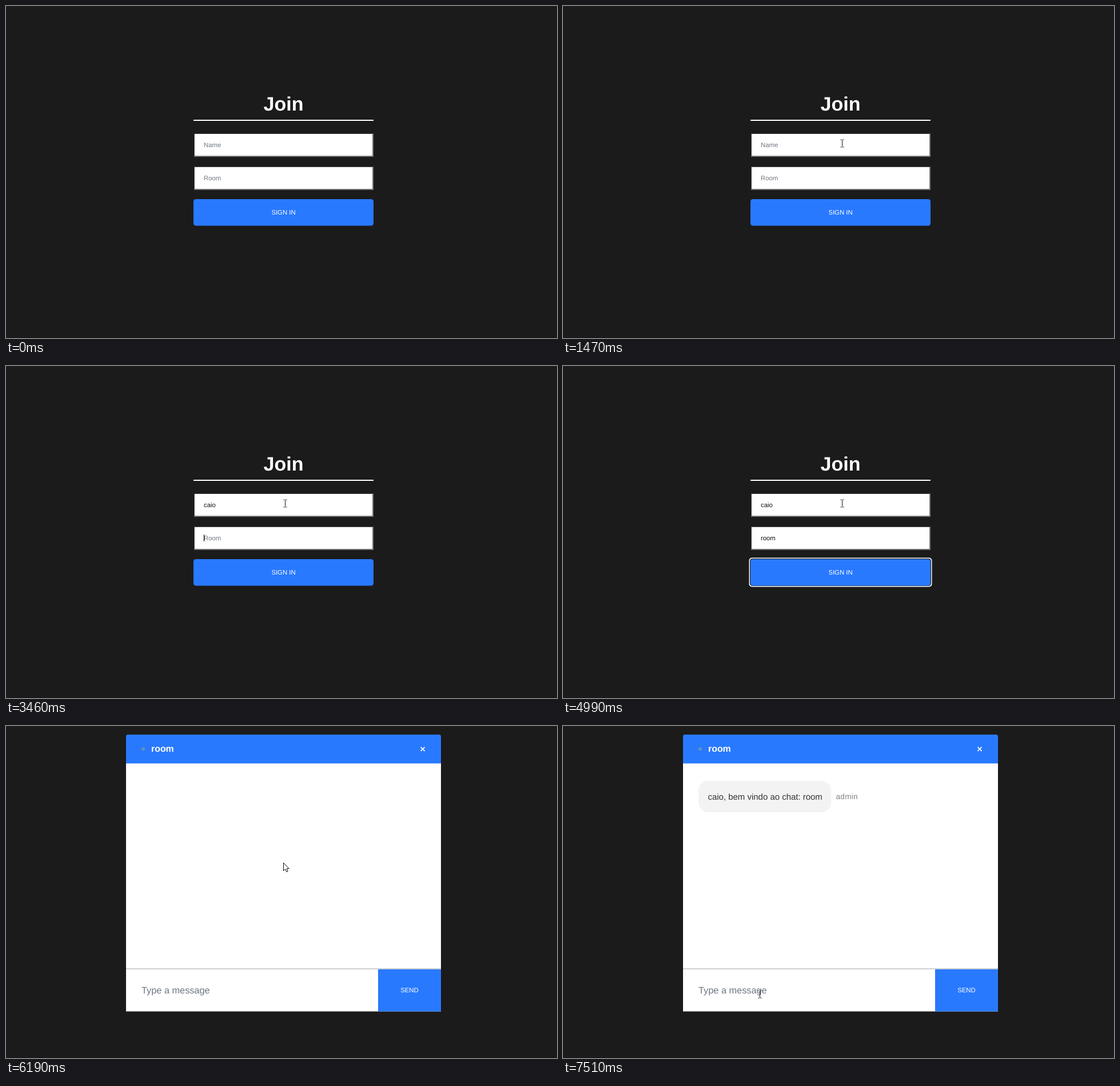
These frames come from a looping animation (964 by 581 pixels, 8 s). An HTML page:

```html
<!DOCTYPE html>
<html lang="en">
<head>
<meta charset="utf-8">
<title>Chat sign-in</title>
<style>
  html, body { margin: 0; width: 100%; height: 100%; overflow: hidden; background: #1b1b1c; }
  svg { display: block; width: 964px; height: 581px; }
  text {
    font-family: "Liberation Sans", Arial, sans-serif;
    font-size: 11.33px;
    text-rendering: geometricPrecision;
    white-space: pre;
  }
  .mid { text-anchor: middle; }
  .hint { fill: #6f7782; }
  .typed { fill: #111; }
  .blue { fill: #2979ff; }
  .white { fill: #fff; }
  .title { font-size: 34px; font-weight: bold; }
  .room { font-size: 15.9px; font-weight: bold; }
  .compose { font-size: 16.32px; }
  .message { font-size: 14.96px; fill: #353535; }
  .sender { font-size: 13.6px; letter-spacing: .255px; fill: #828282; }
</style>
</head>
<body>
<svg viewBox="0 0 964 581">
  <defs>
    <g id="box">
      <path fill="#767676" d="M329 0h314v41H329z"/>
      <path fill="#4a4a4a" d="M329 0h313l-1 1H330v38l-1 1z"/>
      <path class="white" d="M330 1h311v38H330z"/>
    </g>
  </defs>
  <rect width="964" height="581" fill="#1b1b1c"/>
  <rect y="580" width="964" height="1" fill="#131314"/>

  <g id="join">
    <text class="title mid white" x="485.5" y="183">Join</text>
    <rect class="white" x="328" y="199" width="315" height="2"/>
    <use href="#box" y="223"/>
    <use href="#box" y="281"/>
    <text class="hint" id="nameHint" x="346" y="247">Name</text>
    <text class="typed" id="name" x="346" y="247"></text>
    <text class="hint" id="roomHint" x="346" y="305">Room</text>
    <text class="typed" id="room" x="346" y="305"></text>
    <g id="ring">
      <rect class="white" x="325.5" y="335.5" width="320" height="51" rx="5"/>
      <rect fill="#101010" x="327" y="337" width="317" height="48" rx="4.5"/>
    </g>
    <rect class="blue" x="328" y="338" width="315" height="46.4" rx="4.2"/>
    <text class="mid white" x="485.5" y="365">SIGN IN</text>
  </g>

  <g id="chat">
    <rect class="white" x="210" y="60" width="551" height="439.5"/>
    <path class="blue" d="M210 65.5V18.4q0-3.4 3.4-3.4H757.6q3.4 0 3.4 3.4V65.5z"/>
    <rect x="237" y="37.5" width="6" height="5.5" rx="2" fill="#5f92c8"/>
    <text class="room white" x="254" y="45.3">room</text>
    <path d="M725.5 36.8l7 7m0-7l-7 7" stroke="#fff" stroke-width="1.7"/>
    <g id="welcome">
      <rect x="237" y="96" width="232" height="55" rx="17" fill="#f3f3f3"/>
      <text class="message" x="253.5" y="128.6">caio, bem vindo ao chat: room</text>
      <text class="sender" x="477.5" y="128">admin</text>
    </g>
    <rect x="210" y="424" width="551" height="1.8" fill="#cbcccc"/>
    <text class="compose hint" x="237" y="468">Type a message</text>
    <rect class="blue" x="651" y="425.8" width="110" height="73.7"/>
    <text class="mid white" x="706" y="466">SEND</text>
  </g>

  <rect id="caret" width="1" fill="#000"/>
  <path id="arrow" fill="#fff" stroke-width="1" d="M.5 .5V14.4L3.7 11.5L5.9 16.3L8.1 15.3L6 10.6H10.2z"/>
  <path id="beam" fill="none" stroke="#111" d="M-3 -6.5H-.8M.8 -6.5H3M-3 6.5H-.8M.8 6.5H3M0 -6V6"/>
</svg>
<script>
const LOOP = 8000;
const el = id => document.getElementById(id);
const show = (id, on) => el(id).setAttribute('visibility', on ? 'inherit' : 'hidden');
const within = (t, spans) => spans.some(([a, b]) => t >= a && t < b);
const ease = p => p * p * (3 - 2 * p);

const fields = [
  { id: 'name', word: 'caio', keys: [2630, 2730, 2930, 3000], y: 237,
    blink: [[1000, 1470], [2000, 2530], [2630, 3460]] },
  { id: 'room', word: 'room', keys: [4190, 4320, 4520, 4720], y: 295,
    blink: [[3460, 3930], [4190, 4990]] }
];

// Position along a straight stroke, refreshed every `tick` ms
function stroke(t, start, tick, count, from, to) {
  const k = Math.min(count, Math.max(0, Math.floor((t - start) / tick)));
  const p = ease(k / count);
  return from.map((v, i) => Math.round(v + (to[i] - v) * p));
}

function pointer(t) {
  if (t < 5250) return stroke(t, 330, 67, 9, [868, 550], [488, 240]);
  if (t < 6190) return [486, 239];
  if (t < 7110) return stroke(t, 6190, 72, 10, [485, 239], [347, 466]);
  return [344, 469];
}

function overText(t, x, y) {
  if (t >= 5250) return y >= 426 && x < 651;
  return x > 328 && x < 643 && within(y, [[223, 264], [281, 322]]);
}

function drawCaret(x, y, h) {
  const c = el('caret');
  c.setAttribute('x', x);
  c.setAttribute('y', y);
  c.setAttribute('height', h);
  show('caret', true);
}

function render(t) {
  const inChat = t >= 5250;
  show('join', !inChat);
  show('chat', inChat);
  show('ring', t >= 4990);
  show('welcome', t >= 6320);
  show('caret', false);

  for (const f of fields) {
    const text = f.word.slice(0, f.keys.filter(k => t >= k).length);
    el(f.id).textContent = text;
    show(f.id + 'Hint', !text);
    if (within(t, f.blink)) {
      const w = text ? el(f.id).getComputedTextLength() : 0;
      drawCaret(346 + Math.round(w), f.y, 12);
    }
  }
  if (within(t, [[6980, 7510]])) drawCaret(237, 453, 18);

  const [x, y] = pointer(t);
  const beam = overText(t, x, y);
  show('arrow', t >= 330 && !beam);
  show('beam', t >= 330 && beam);
  el('arrow').setAttribute('transform', `translate(${x} ${y})`);
  el('arrow').setAttribute('stroke', within(t, [[5250, 6190]]) ? '#2f63a8' : '#111');
  el('beam').setAttribute('transform', `translate(${x + .5} ${y + .5})`);
}

const begin = performance.now();
function loop() {
  render((performance.now() - begin) % LOOP);
  requestAnimationFrame(loop);
}
loop();
</script>
</body>
</html>
```
